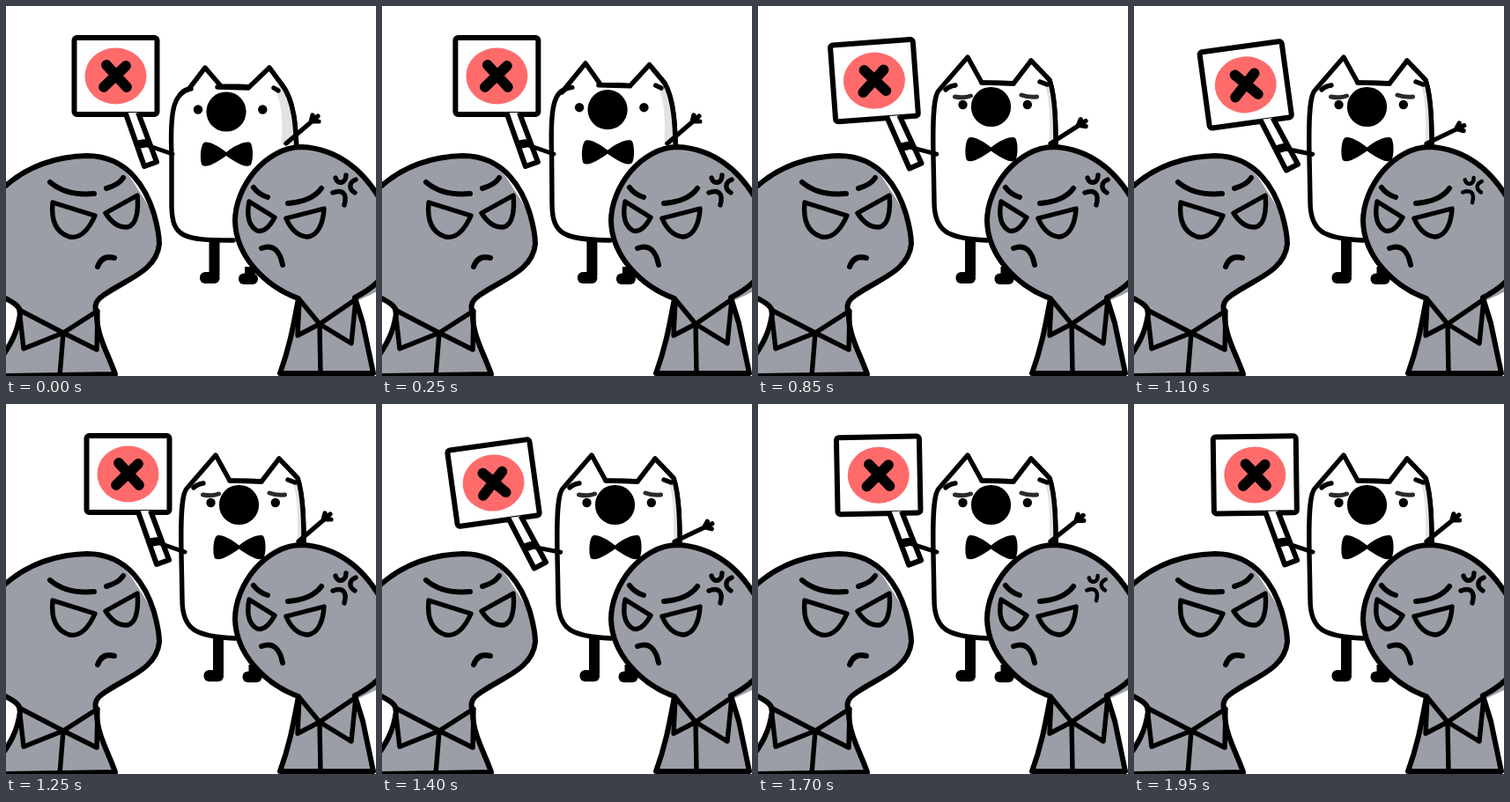
These frames come from a looping animation (420x420 px, 2 s). An HTML page:

```html
<!DOCTYPE html>
<html lang="en">
<head>
<meta charset="utf-8">
<title>Rejected sign</title>
<style>
  html, body { margin: 0; height: 100%; overflow: hidden; background: #fff; }
  svg { display: block; width: 100vw; height: 100vh; }
  .ink { fill: none; stroke: #000; stroke-width: 6; stroke-linecap: round; stroke-linejoin: round; }
  .thin { stroke-width: 5.4; }
  .white { fill: #fff; }
  .grey { fill: #9b9ea6; }
</style>
</head>
<body>
<svg viewBox="0 0 420 420">
  <!-- cat -->
  <g id="legs">
    <path d="M236.500 262V306M277 296V308" fill="none" stroke="#000" stroke-width="12"/>
    <rect x="220" y="302" width="22.500" height="13" rx="6"/>
    <rect x="264" y="303.500" width="22" height="12.500" rx="6"/>
  </g>
  <path id="body" class="ink thin white"/>
  <path id="shade" fill="#e2e2e2"/>
  <path id="side" class="ink thin"/>
  <path id="tufts" class="ink thin"/>
  <g id="face">
    <circle cx="218" cy="117.500" r="5.200"/>
    <circle cx="291.300" cy="117.500" r="5.200"/>
    <circle cx="250" cy="120" r="22.600"/>
    <path d="M250 166C240 158 229 153 225 155C220 158 220 178 223 181C229 184 240 177 250 170C260 177 271 184 277 181C281 178 281 158 277 155C272 153 260 158 250 166Z"/>
    <path id="brows" class="ink" style="stroke:#2b2b2b;stroke-width:5" d="M209 108.500Q219 110.500 227 107.500M284.500 106.500Q292 109.500 302 108.500"/>
  </g>
  <g id="wave">
    <path class="ink" style="stroke-width:5.200" d="M318 156L346 132M346 132L348 124M347 131L354 125M347 131L355 131"/>
  </g>
  <g id="sign">
    <rect class="ink white" x="77.500" y="36" width="94" height="87" rx="3"/>
    <path class="ink white" style="stroke-linecap:butt" d="M135.500 121L157 182L171 177L150 121"/>
    <ellipse cx="124.500" cy="79.500" rx="35" ry="32" fill="#ff6b6b"/>
    <path class="ink" style="stroke-width:11.800" d="M114 67L137 92M136 68L111 92"/>
    <path class="ink" style="stroke-width:5" d="M189 168L160 158"/>
    <path class="ink" style="stroke-width:9.500" d="M151 157L157 156"/>
  </g>

  <!-- left onlooker -->
  <path class="grey" d="M-6 211C18 186 50 171 92 170C118 171 136 183 149 207C165 230 174 248 174 270C173 296 140 316 106 334C101 342 103 380 124 420H-6Z"/>
  <path fill="#fff" d="M-6 333C8 338 15 344 15 352C11 372 2 388 -6 400Z"/>
  <path class="ink" d="M-6 209C18 186 50 171 92 170C140 170 160 210 168 236C173 254 174 262 174 270C171 304 129 312 106 332C99 339 102 345 103 353C104 376 116 395 124 418L-6 420M-6 329C8 336 17 341 16 349C13 372 4 386 -6 400"/>
  <path class="ink thin" d="M15 345L65 371L104 346L103 390L65 371L20 389ZM65 371L61 420"/>
  <path class="ink" d="M50 200Q69 216 100 213M114 207Q128 203 133 195M104 296Q109 282 123 286"/>
  <path class="ink thin" d="M53 223L101 238C92 258 82 264 72 262C56 257 51 243 53 223ZM113 235L149 215C151 235 147 249 138 251C126 252 118 243 113 235Z"/>

  <!-- right onlooker -->
  <path class="grey" d="M333 333C294 319 261 284 260 244C260 206 294 160 336 160C374 162 405 184 426 222V322L396 336L417 418H311L331 345Z"/>
  <path class="ink" d="M426 309Q414 322 396 331L405 360L417 417H311C323 384 327 358 332 332C294 318 261 284 260 244C260 206 294 160 336 160C374 162 405 184 426 222"/>
  <path class="ink thin" d="M333 333L356 361L397 333L392 383L356 361L331 374ZM356 361L357 417"/>
  <path class="ink" d="M281 206Q287 214 297 217M320 224Q347 222 358 207M290 275Q309 268 314 294"/>
  <path class="ink thin" d="M276 222L305 240C299 251 292 257 285 255C276 250 273 238 276 222ZM318 241L361 230C360 247 354 261 342 262C330 261 323 253 318 241Z"/>
  <g id="anger">
    <path class="ink thin" d="M374 195C376 203 386 202 386 192M397 197C389 200 389 208 396 212M371 212C381 208 388 212 384 226"/>
  </g>
</svg>
<script>
const LOOP = 2000;
const $ = id => document.getElementById(id);

// Each outline leans from its first pose to its second.
const leans = {
  body: ["M258 266C200 266 189 262 188 228L188 170C186 120 190 100 207 95L226 70L244 91C255 91 265 91 276 92L299 70L313 89C328 108 329 140 330 165",
         "M260 266C215 264 200 256 200 222L199 170C198 120 200 100 206 95L238 58L254 87C265 87 275 87 290 88L310 62L331 84C338 105 338 140 338 165"],
  shade: ["M304 93C314 110 314 130 313 158L329 158C328 125 327 106 313 91Z",
          "M325 88C332 105 331 130 331 158L338 158C338 125 337 104 331 87Z"],
  side: ["M299 70L313 89C328 108 329 140 330 165",
         "M310 62L331 84C338 105 338 140 338 165"],
  tufts: ["M198 100Q203 94 210 94M240 92L275 93M304 93L309 96",
          "M213 95Q217 91 224 90M254 87L290 88M320 86L328 89"]
};

const clamp = x => Math.min(1, Math.max(0, x));
const ease = x => { x = clamp(x); return x ** 3 * (x * (x * 6 - 15) + 10); };
const set = (id, value) => $(id).setAttribute("transform", value);

function blend(a, b, p) {
  const ends = b.match(/\d+/g);
  let i = 0;
  return a.replace(/\d+/g, n => (+n + (ends[i++] - n) * p).toFixed(2));
}

// Two full swings, then only a slight sway.
function swing(t) {
  if (t < 750) return 0;
  const wave = (1 - Math.cos((t - 750) / 250 * Math.PI)) / 2;
  return wave * (t < 1750 ? 1 : 0.07);
}

// The mark flips between large and small every 300 ms.
function angerScale(t) {
  const beat = Math.floor((t + 50) / 300);
  const move = beat ? clamp((t + 50 - beat * 300) / 100) : 1;
  const large = beat % 2 ? 1 - move : move;
  return 0.83 + 0.17 * large;
}

function draw(t) {
  const p = ease(t / 550), s = swing(t), k = angerScale(t);
  for (const id in leans) $(id).setAttribute("d", blend(...leans[id], p));
  set("legs", `translate(${4.5 * p} 0)`);
  set("face", `translate(${14.5 * p} ${-5.5 * p})`);
  set("sign", `translate(${14 * p} 0) rotate(${-12 * s} 191 171)`);
  set("wave", `translate(${14 * p} 0) rotate(${23 * s} 317 156)`);
  set("anger", `translate(384 209) scale(${k}) translate(-384 -209)`);
  $("brows").style.display = t < 780 ? "none" : "";
}

const start = performance.now();
function tick() {
  draw((performance.now() - start) % LOOP);
  requestAnimationFrame(tick);
}
tick();
</script>
</body>
</html>
```
